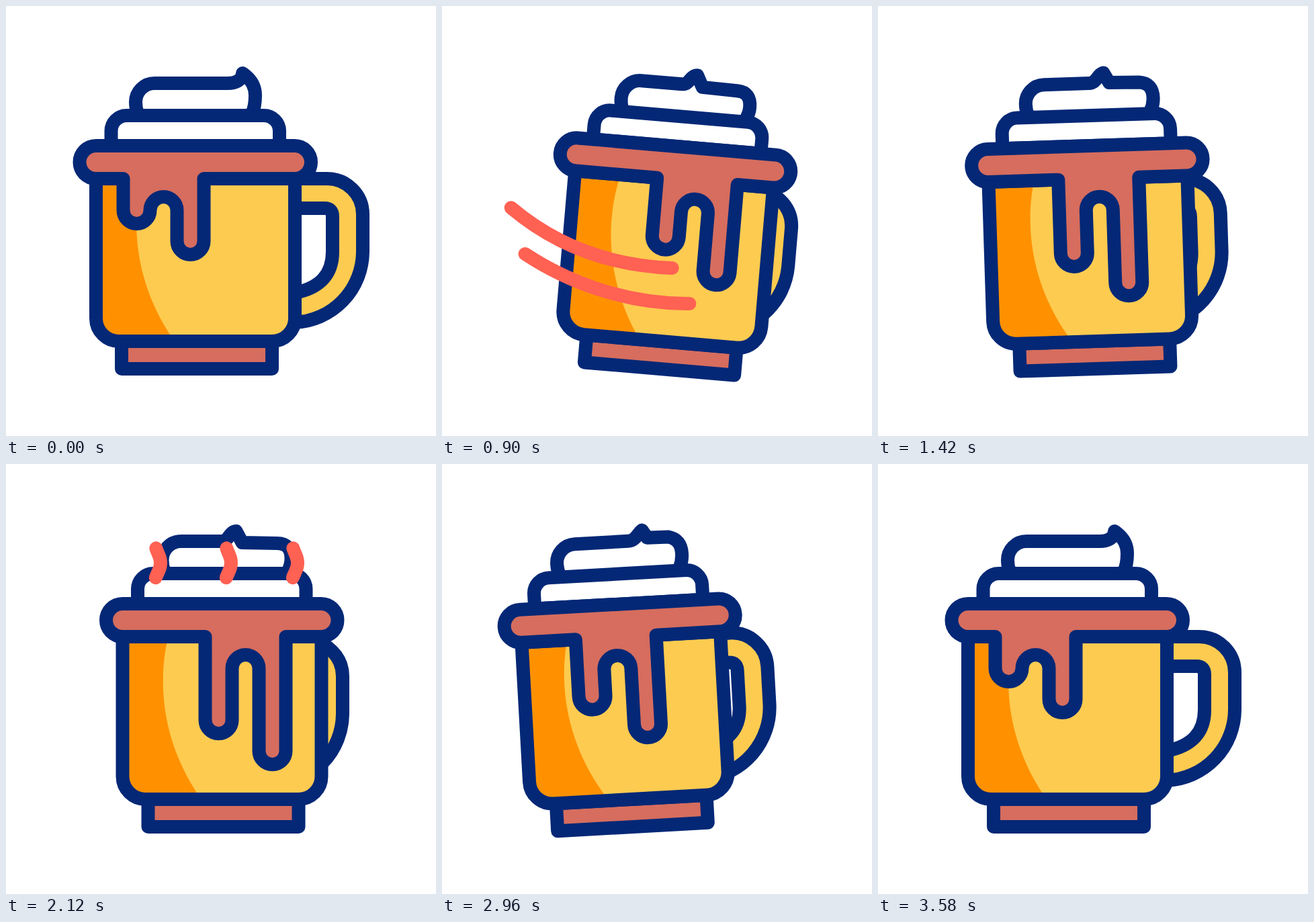
Write an HTML page that moves like this. It is 640 px wide and 640 px high and loops after 3600 ms.

```html
<!DOCTYPE html>
<html lang="en">
<head>
<meta charset="utf-8">
<title>Hot drink</title>
<style>
  html, body { margin: 0; width: 100%; height: 100%; overflow: hidden; background: #fff; }
  svg { display: block; width: 100vw; height: 100vh; }
  .ink { stroke: #042876; stroke-width: 20; stroke-linejoin: round; stroke-linecap: round; }
  .glow { fill: none; stroke: #ff6153; stroke-width: 20; stroke-linecap: round; }
</style>
</head>
<body>
<svg viewBox="0 0 640 640">
  <g id="mug">
    <path id="handle" class="ink" fill="#fdcb50"
      d="M430 257H478A53 53 0 0 1 531 310V366A106 106 0 0 1 430 471V427Q486 416 486 366V313Q486 301 474 301H430Z"/>
    <path class="ink" fill="#d66d5e" d="M172 499H396V540H172Z"/>
    <path fill="#fdcb50" d="M134 257V465a34 34 0 0 0 34 34H396a34 34 0 0 0 34-34V257Z"/>
    <path fill="#ff9100" d="M134 257H202C190 305 183 402 251 499H168a34 34 0 0 1-34-34Z"/>
    <path class="ink" fill="none" d="M134 257V465a34 34 0 0 0 34 34H396a34 34 0 0 0 34-34V257Z"/>
    <path id="cream" class="ink" fill="#fff"/>
    <path class="ink" fill="#fff" d="M156.500 208V186a23 23 0 0 1 23-23H384a23 23 0 0 1 23 23V208Z"/>
    <path id="rim" class="ink" fill="#d66d5e"/>
    <g id="steam"></g>
  </g>
  <path class="glow swipe" pathLength="1" d="M43 238C115 330 215 385 342 390S400 388 440 380"/>
  <path class="glow swipe" pathLength="1" d="M58 314C118 379 235 444 368 443S430 442 466 434"/>
</svg>
<script>
const LOOP = 3600;
const $ = id => document.getElementById(id);
const lerp = (a, b, p) => a + (b - a) * p;
const ease = (t, from, to) => {
  const u = Math.min(1, Math.max(0, (t - from) / (to - from)));
  return u * u * (3 - 2 * u);
};

// The mug is spun, rocks back and settles; later it rocks home in reverse.
function pose(t) {
  const spin = ease(t, 545, 880);
  const rock = ease(t, 880, 1222);
  const settle = ease(t, 1222, 1560);
  const leave = ease(t, 2530, 2855);
  const rockHome = ease(t, 2855, 3245);
  const unspin = ease(t, 3245, 3575);
  const sway = settle - rock - leave + rockHome;
  return {
    shift: 39.5 * (spin - leave),
    tilt: 5 * (spin - rock + rockHome - unspin + sway),
    turn: spin - unspin + 0.63 * sway,
    drip: 38.6 * (ease(t, 0, 545) + settle - leave - unspin)
  };
}

function creamPath(turn) {
  const k = turn * (1.5 - 0.5 * turn);
  const mix = (front, side) => lerp(front, side, k);
  const tip = mix(352, 303), edge = mix(371, 385);
  return 'M196 160Q193 152 193 143C193 128 205 115 221 115' +
    `H${tip - 22}C${tip - 10} 115 ${tip - mix(0, 11)} ${mix(110, 101)} ${tip} 100` +
    `L${tip + mix(4, 9)} ${mix(103, 117)}L${mix(356, 364)} ${mix(103, 118)}` +
    `Q${edge} ${mix(115, 118)} ${edge} ${mix(133, 141)}Q${edge} 150 ${edge - 5} 160`;
}

function rimPath(turn, drip) {
  const x = 294.5 + 82.5 * turn;
  return `M134 208H429.500A24.500 24.500 0 0 1 429.500 257H${x}V${350 + drip}a20 20 0 0 1-40 0` +
    `V304a20 20 0 0 0-40 0V${304 + drip}a20 20 0 0 1-40 0V257H134A24.500 24.500 0 0 1 134 208Z`;
}

// Shows only the part of a path between tail and head (0 to 1).
function trim(el, tail, head) {
  const len = head - tail;
  el.style.visibility = len > 0.002 ? 'visible' : 'hidden';
  el.setAttribute('stroke-dasharray', `${Math.max(len, 0.002)} 3`);
  el.setAttribute('stroke-dashoffset', -tail);
}

// A wavy column that sways less as it rises.
function column(cx) {
  const el = document.createElementNS('http://www.w3.org/2000/svg', 'path');
  const pts = [];
  for (let y = 381; y >= 100; y -= 2) {
    const amp = 4 + (y - 100) / 100;
    pts.push(`${(cx - amp * Math.cos((y - 115) / 32 * Math.PI)).toFixed(2)} ${y}`);
  }
  el.setAttribute('class', 'glow');
  el.setAttribute('pathLength', 1);
  el.setAttribute('d', 'M' + pts.join('L'));
  $('steam').append(el);
  return el;
}
const steam = [186, 291, 390].map(column);
const swipes = document.querySelectorAll('.swipe');

function draw(t) {
  const { shift, tilt, turn, drip } = pose(t);
  $('mug').setAttribute('transform', `translate(${shift} 0) rotate(${tilt} 284 540)`);
  $('handle').setAttribute('transform', `translate(${-69.5 * turn} ${6 * turn})`);
  $('cream').setAttribute('d', creamPath(turn));
  $('rim').setAttribute('d', rimPath(turn, drip));

  // two puffs of steam, half a second each
  const puff = t < 2280 ? 1780 : 2280;
  const puffTail = ease(t, puff, puff + 500);
  const puffHead = ease(t, puff, puff + 415);
  steam.forEach(el => trim(el, puffTail, puffHead));

  const swipeTail = ease(t, 783, 1203);
  const swipeHead = ease(t, 555, 1055);
  swipes.forEach(el => trim(el, swipeTail, swipeHead));
}

const began = performance.now();
function tick() {
  draw((performance.now() - began) % LOOP);
  requestAnimationFrame(tick);
}
tick();
</script>
</body>
</html>
```
